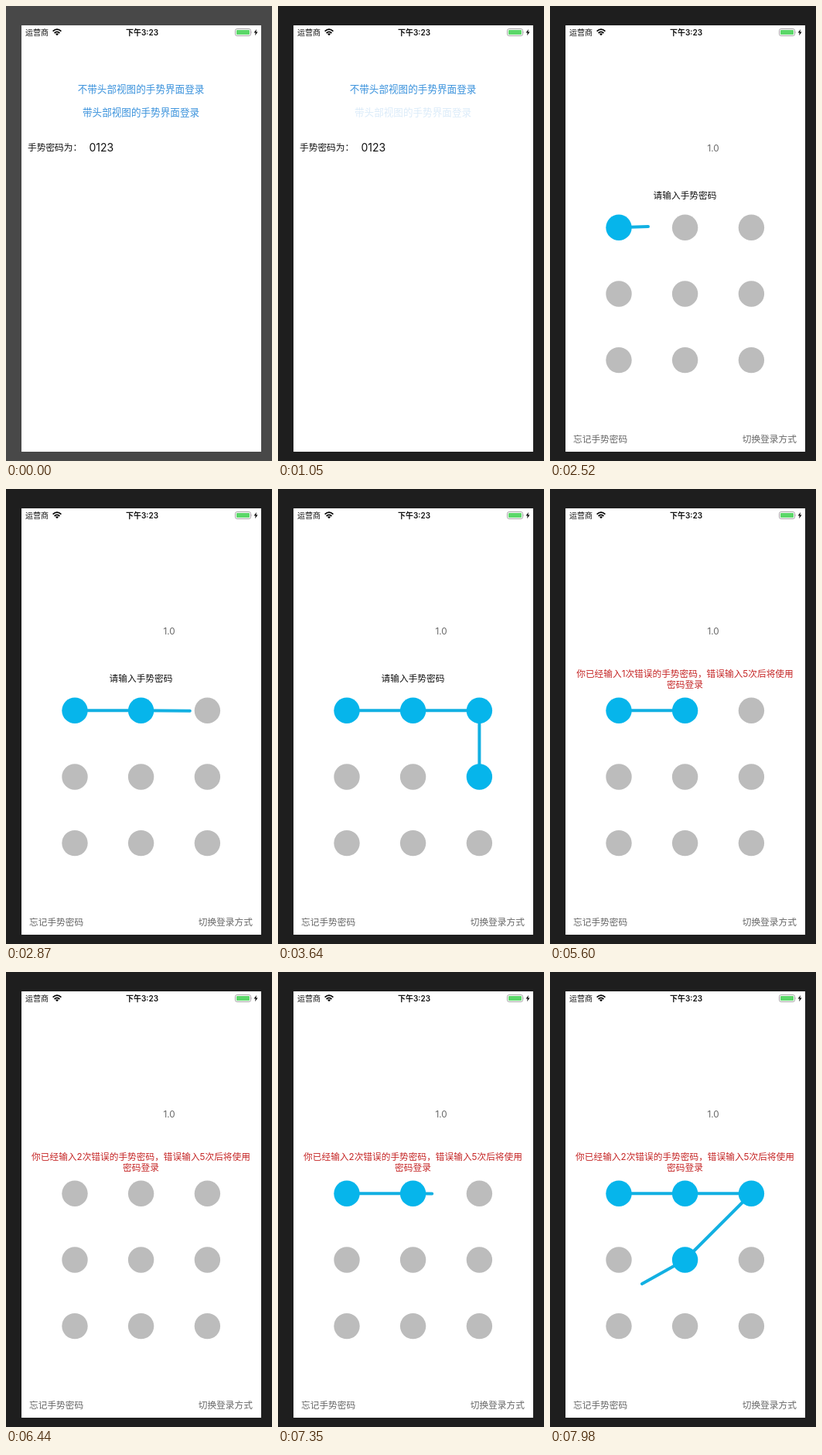
Recreate the animation shown at these times as an HTML page. Size 344 px wide and 588 px high, loop 8000 ms.

```html
<!DOCTYPE html>
<html lang="zh-CN">
<head>
<meta charset="utf-8">
<title>手势密码登录</title>
<style>
  html, body { margin: 0; width: 100%; height: 100%; overflow: hidden; background: #1e1e1e; }
  svg { display: block; width: 344px; height: 588px; }
  text { font: 11.7px Inter, "Noto Sans CJK SC", "Noto Sans CJK", sans-serif; fill: #111; }
  .mid { text-anchor: middle; }
  .link { font-size: 12.6px; fill: #3a92dc; }
  .code { font-size: 14px; }
  .status { font-size: 10px; }
  .clock { font-weight: 600; }
  .soft { fill: #666; }
  .error { fill: #c52525; }
  .wifi path { fill: none; stroke: #000; stroke-width: 1.7; }
  #trail { fill: none; stroke: #12b0e2; stroke-width: 4; stroke-linecap: round; stroke-linejoin: round; }
  #dots circle { fill: #bcbcbc; }
  #dots .on { fill: #06b5eb; }

  /* page changes are hard cuts on the 8 s loop */
  [hidden] { display: none; }
</style>
</head>
<body>
<svg viewBox="0 0 344 588">
  <rect id="frame" width="344" height="588" fill="#484848"/>
  <rect x="20" y="25" width="310" height="551" fill="#fff"/>

  <g id="statusBar">
    <text class="status" x="25" y="37.8">运营商</text>
    <g class="wifi">
      <path d="M60.6 32.6Q66 27.6 71.4 32.6"/>
      <path d="M62.6 35Q66 31.9 69.4 35"/>
      <path d="M64 35.9Q66 34.4 68 35.9L66 38.2Z" style="fill:#000;stroke:none"/>
    </g>
    <text class="status clock mid" x="176" y="37.6">下午3:23</text>
    <rect x="296.5" y="29.5" width="20" height="9" rx="2.3" fill="none" stroke="#a5a5a5"/>
    <rect x="298" y="31" width="17" height="6" rx="1" fill="#5bd769"/>
    <path d="M317.6 32.5q1.4 1.5 0 3z" fill="#a5a5a5"/>
    <path d="M324 30L320.6 34.6H322.8L322 38.2L325.6 33.4H323.3Z" fill="#000"/>
  </g>

  <g id="home">
    <text class="link mid" x="174.5" y="112">不带头部视图的手势界面登录</text>
    <text class="link mid" id="pressed" x="174.5" y="142">带头部视图的手势界面登录</text>
    <text x="28" y="187.3">手势密码为：</text>
    <text class="code" x="107.5" y="188">0123</text>
  </g>

  <g id="lock" hidden>
    <text class="soft" x="203.5" y="187.5">1.0</text>
    <text class="mid" id="prompt" x="174.5" y="249.3">请输入手势密码</text>
    <g id="warning">
      <text class="error mid" id="count" x="174.5" y="243"></text>
      <text class="error mid" x="174.5" y="256.8">密码登录</text>
    </g>
    <polyline id="trail"/>
    <g id="dots"></g>
    <text class="soft" x="30" y="564.3">忘记手势密码</text>
    <text class="soft" x="248.7" y="564.3">切换登录方式</text>
  </g>
</svg>
<script>
  const LOOP = 8000, STEP = 70, RADIUS = 16.7;
  const PRESS = 1050, OPEN = 1120;
  const $ = id => document.getElementById(id);

  const centers = [];
  for (const y of [286.3, 372, 457.6])
    for (const x of [89, 174.6, 260.4]) centers.push([x, y]);

  const dots = centers.map(([x, y]) => {
    const dot = document.createElementNS("http://www.w3.org/2000/svg", "circle");
    dot.setAttribute("cx", x);
    dot.setAttribute("cy", y);
    dot.setAttribute("r", RADIUS);
    return $("dots").appendChild(dot);
  });

  // Each swipe: release time and the finger's key points [time, x, y]
  const swipes = [
    { end: 3990, keys: [[2520, 127, 285], [2940, 260, 287], [3430, 260.4, 287],
                        [3500, 260.4, 315], [3570, 260.4, 345], [3640, 260.4, 372]] },
    { end: 6230, keys: [[5180, 91, 286], [5250, 108, 286], [5950, 260, 287], [6160, 260, 290]] },
    { end: LOOP, keys: [[6860, 91, 286], [6930, 108, 286], [7630, 260, 287],
                        [7700, 243, 304], [7840, 182, 365], [7910, 150, 386], [7980, 119, 403]] }
  ];

  function fingerAt(keys, t) {
    const i = keys.findIndex(k => k[0] >= t);
    if (i < 0) return keys[keys.length - 1].slice(1);
    if (i === 0) return keys[0].slice(1);
    const [a, b] = [keys[i - 1], keys[i]];
    const f = (t - a[0]) / (b[0] - a[0]);
    return [a[1] + (b[1] - a[1]) * f, a[2] + (b[2] - a[2]) * f];
  }

  function hitDots(keys, t) {
    const hits = [0];
    for (let s = keys[0][0]; s <= t; s += STEP) {
      const [x, y] = fingerAt(keys, s);
      const i = centers.findIndex(c => Math.hypot(c[0] - x, c[1] - y) < RADIUS);
      if (i >= 0 && !hits.includes(i)) hits.push(i);
    }
    return hits;
  }

  function render(t) {
    $("frame").setAttribute("fill", t < PRESS ? "#484848" : "#1e1e1e");
    $("pressed").style.opacity = t < PRESS ? 1 : 0.18;
    $("home").toggleAttribute("hidden", t >= OPEN);
    $("lock").toggleAttribute("hidden", t < OPEN);

    const fails = swipes.filter(s => t >= s.end).length;
    $("prompt").toggleAttribute("hidden", fails > 0);
    $("warning").toggleAttribute("hidden", fails === 0);
    $("count").textContent = `你已经输入${fails}次错误的手势密码，错误输入5次后将使用`;

    const swipe = swipes.find(s => t >= s.keys[0][0] && t < s.end);
    const hits = swipe ? hitDots(swipe.keys, t) : [];
    dots.forEach((dot, i) => dot.classList.toggle("on", hits.includes(i)));
    const points = hits.map(i => centers[i]);
    if (swipe) points.push(fingerAt(swipe.keys, t));
    $("trail").setAttribute("points", points.join(" "));
  }

  const start = performance.now();
  let shown = -1;
  function tick() {
    const t = (performance.now() - start) % LOOP;
    const step = Math.floor(t / STEP) * STEP;
    if (step !== shown) render(shown = step);
    requestAnimationFrame(tick);
  }
  tick();
</script>
</body>
</html>
```
